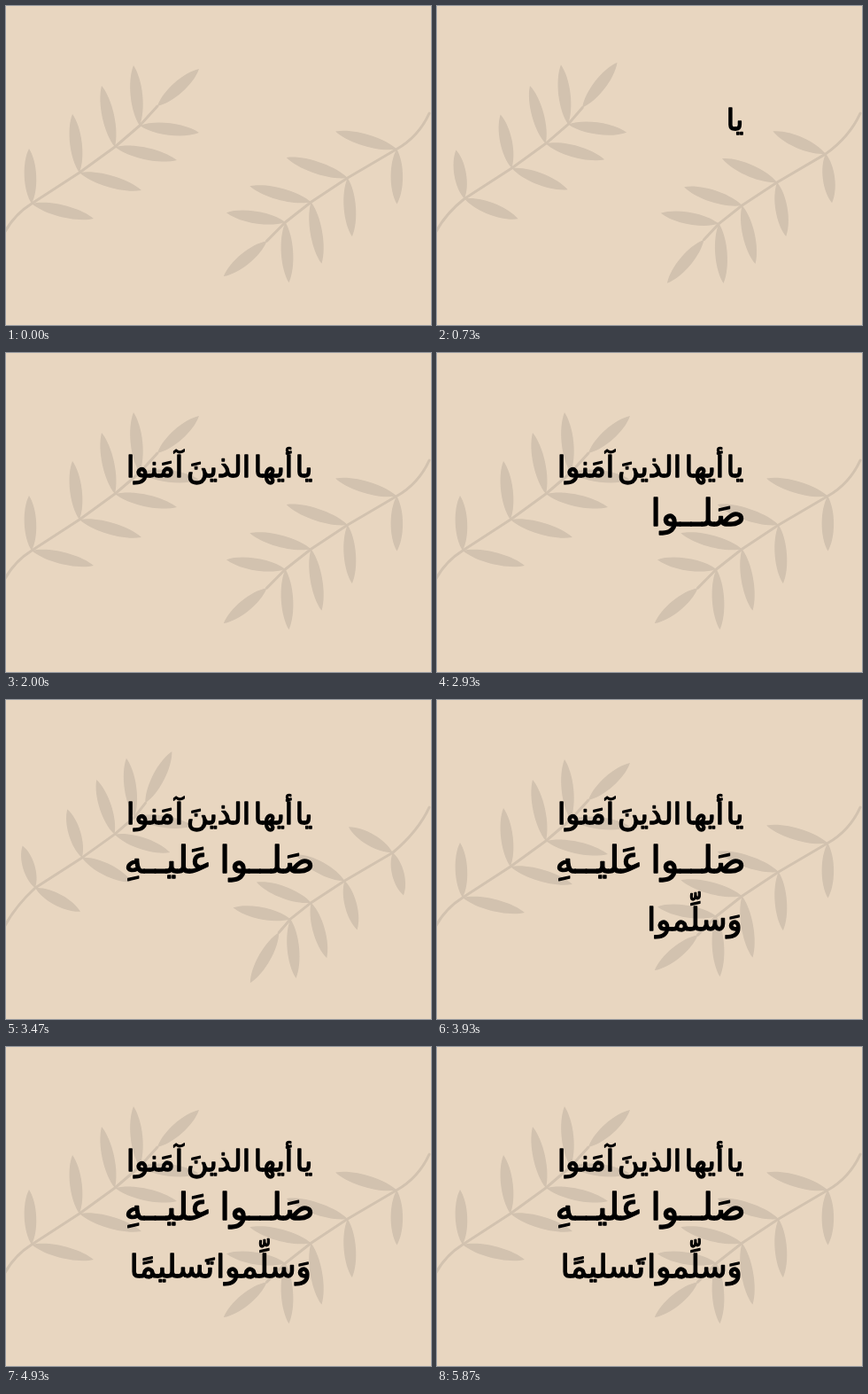
An HTML page that plays this animation: 480x360 px, repeating every 6070 ms.

```html
<!DOCTYPE html>
<html lang="ar">
<head>
<meta charset="utf-8">
<style>
  html, body { margin: 0; height: 100%; overflow: hidden; background: #e8d6c0; }
  svg { display: block; width: 100vw; height: 100vh; }
  .leaves { fill: #d2c2af; }
  .stem { fill: none; stroke: #d2c2af; stroke-width: 3; stroke-linejoin: round; stroke-linecap: round; }
  text {
    font-family: "DejaVu Sans", sans-serif;
    direction: rtl;
    text-anchor: middle;
    stroke: #000;
    stroke-width: 1.4;
    stroke-linejoin: round;
  }
</style>
</head>
<body>
<svg viewBox="0 0 480 360">
  <g id="branch">
    <path class="leaves"/>
    <path class="stem"/>
  </g>
  <use href="#branch" transform="translate(460.5 385.5) rotate(182.5)"/>
  <g font-size="33.5">
    <text x="336.5" y="140">يا</text>
    <text x="302" y="140">أيها</text>
    <text x="240" y="140">الذينَ</text>
    <text x="168" y="140">آمَنوا</text>
  </g>
  <g font-size="42">
    <text x="295" y="195">صَلــوا</text>
    <text x="183" y="195">عَليــهِ</text>
  </g>
  <g font-size="35.5">
    <text x="291" y="260">وَسلِّموا</text>
    <text x="187.5" y="260">تَسليمًا</text>
  </g>
</svg>
<script>
const LOOP = 6070;
const ROOT = "M-6 265Q5 238 ";
// Stem joints from root to end, each followed by the tips of its leaves.
const NODES = [
  [[29, 223], [26, 161], [99, 240]],
  [[83, 188], [75, 122], [153, 208]],
  [[123, 159], [108, 90], [193, 174]],
  [[151, 135], [144, 67], [218, 143]],
  [[171, 113], [218, 71]]
];
const LAST = NODES.length - 1;

const leavesPath = document.querySelector(".leaves");
const stemPath = document.querySelector(".stem");
const words = document.querySelectorAll("text");

function leaf(x, y, angle, length) {
  const cos = Math.cos(angle), sin = Math.sin(angle);
  const at = (along, side) =>
    `${x + cos * along * length - sin * side} ${y + sin * along * length + cos * side} `;
  return `M${at(0, 0)}C${at(.25, 9)}${at(.75, 9)}${at(1, 0)}` +
    `C${at(.75, -9)}${at(.25, -9)}${at(0, 0)}Z`;
}

// Swaying bends the stem, and opens and foreshortens the leaves near the root most.
function drawBranch(sway) {
  let leaves = "";
  const joints = NODES.map(([[x, y], ...tips], i) => {
    const jointX = x + sway * (2 - .55 * i * i);
    const jointY = y + sway * (.45 * i * i - 5.5);
    const turn = sway * (i < LAST ? 7 - 2 * i : 10.5) * Math.PI / 180;
    const scale = 1 - sway * (.1 - .03 * i);
    tips.forEach(([tipX, tipY], side) => {
      const angle = Math.atan2(tipY - y, tipX - x) + (side ? turn : -turn);
      leaves += leaf(jointX, jointY, angle, Math.hypot(tipX - x, tipY - y) * scale);
    });
    return `${jointX} ${jointY}`;
  });
  leavesPath.setAttribute("d", leaves);
  stemPath.setAttribute("d", ROOT + joints.join("L"));
}

// Four hard poses a second: rest, bent, fully bent, bent. The beat gains 70 ms every 2.9 s.
function swayAt(time) {
  const phase = (time + 70 * Math.floor(time / 2900)) % 1000;
  const step = [265, 525, 730].filter(limit => phase >= limit).length;
  return 2 - Math.abs(2 - step);
}

function render(now) {
  const time = now % LOOP;
  drawBranch(swayAt(time));
  words.forEach((word, i) => {
    word.style.visibility = time >= 470 + 504 * i ? "visible" : "hidden";
  });
}

const begin = performance.now();
function tick() {
  render(performance.now() - begin);
  requestAnimationFrame(tick);
}
tick();
</script>
</body>
</html>
```
